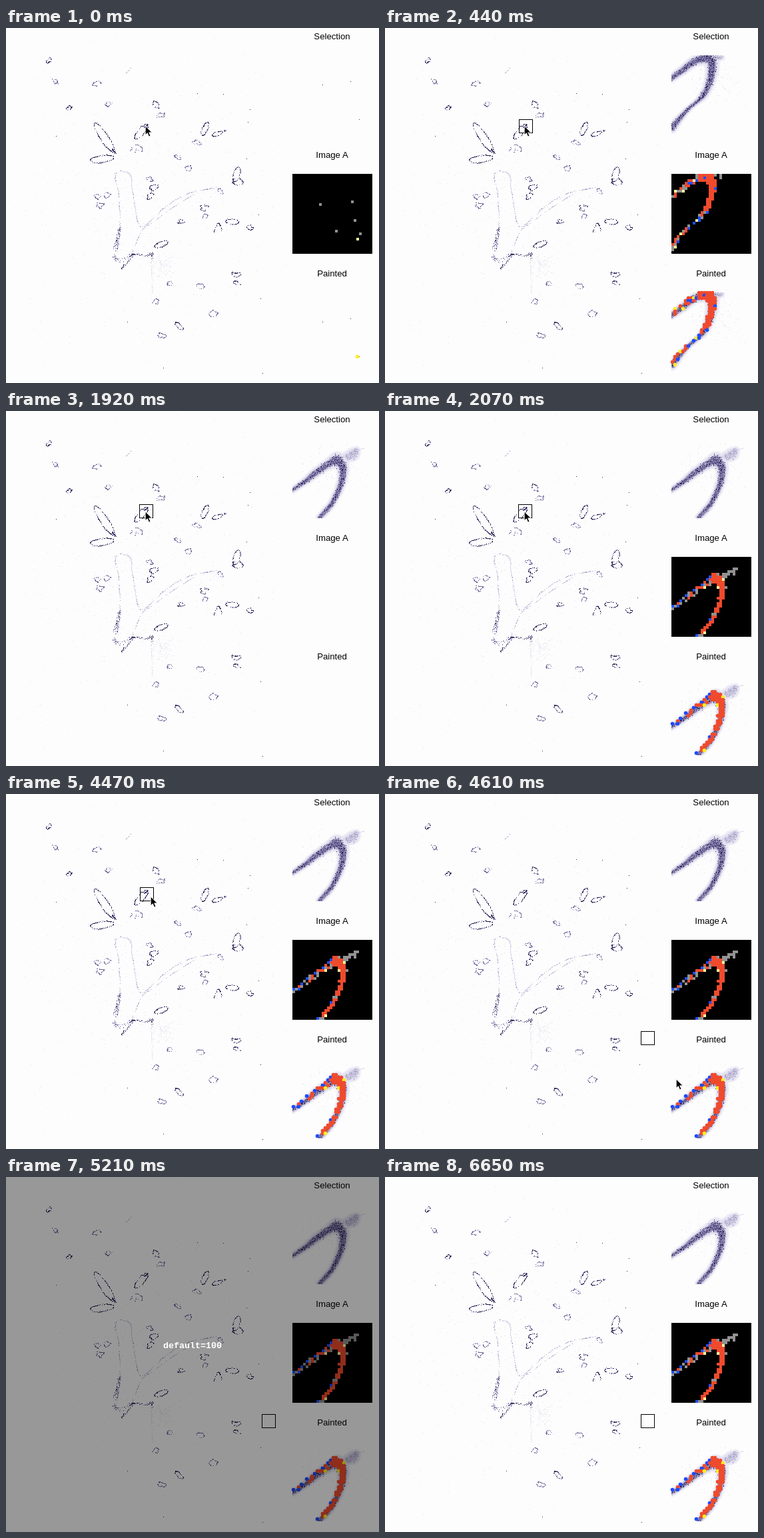
An HTML page for the animation above (8000 ms loop, 560 by 533 pixels).

```html
<!DOCTYPE html>
<html lang="en">
<head>
<meta charset="utf-8">
<title>Tissue selection</title>
<style>
html, body { margin: 0; width: 100%; height: 100%; overflow: hidden; background: #fdfdfd; }
svg { display: block; width: 100vw; height: 100vh; }
.label { font: 13.2px "Liberation Sans", Arial, sans-serif; text-anchor: middle; }
.note { font: bold 13.33px "Liberation Mono", "Courier New", monospace; text-anchor: middle; fill: #fff; }
.ink { shape-rendering: crispEdges; }
</style>
</head>
<body>
<svg id="stage" viewBox="0 0 560 533">
  <defs>
    <filter id="soft"><feGaussianBlur stdDeviation=".9"/></filter>
    <clipPath id="frame"><rect x="430" y="41" width="120" height="120"/></clipPath>
  </defs>
  <rect width="560" height="533" fill="#fdfdfd"/>
  <g id="slide" class="ink"></g>
  <g id="panels"></g>
  <text class="label" x="489.5" y="17">Selection</text>
  <text class="label" x="489.5" y="195">Image A</text>
  <text class="label" x="489.5" y="373">Painted</text>
  <rect id="box" x=".5" y=".5" width="20" height="20" fill="none" stroke="#000"/>
  <path id="cursor" d="M1.2 1V14.6L4.3 11.7L6.6 17.1L9 16.1L6.7 10.9H11.2Z" stroke="#fff" stroke-width=".9"/>
  <g id="dim">
    <rect width="560" height="533" opacity=".4"/>
    <text class="note" x="280" y="257">default=100</text>
  </g>
</svg>
<script>
const $ = id => document.getElementById(id);
const LOOP = 8000;

function add(parent, tag, attrs) {
  const el = document.createElementNS('http://www.w3.org/2000/svg', tag);
  for (const k in attrs) el.setAttribute(k, attrs[k]);
  return parent.appendChild(el);
}

let seed = 4127;
const rnd = () => (seed = seed * 16807 % 2147483647) / 2147483647;
const spread = w => (rnd() + rnd() - 1) * w;
const points = text => text.split(' ').map(p => p.split(',').map(Number));

// Samples about one pixel apart on a smooth curve; width and other values blend along
function curve(pts, closed) {
  const n = pts.length, out = [];
  const at = i => closed ? pts[(i + n) % n] : pts[Math.max(0, Math.min(n - 1, i))];
  for (let i = 0; i < (closed ? n : n - 1); i++) {
    const a = at(i - 1), b = at(i), c = at(i + 1), d = at(i + 2);
    const count = Math.ceil(Math.hypot(c[0] - b[0], c[1] - b[1]));
    for (let k = 0; k < count; k++) {
      const u = k / count;
      out.push(b.map((v, j) => j > 1 ? v + (c[j] - v) * u : v + u / 2 * (c[j] - a[j] +
        u * (2 * a[j] - 5 * v + 4 * c[j] - d[j] + u * (3 * (v - c[j]) + d[j] - a[j])))));
    }
  }
  return out;
}

// Collects one-pixel specks in four tones, dark to pale
const TONES = ['#2a2153', '#6a6397', '#aba7ca', '#e2e0ef'];
class Ink {
  paths = ['', '', '', ''];
  dot(x, y, tone) {
    this.paths[Math.min(3, tone)] += `M${Math.floor(x)} ${Math.floor(y)}h1v1h-1z`;
  }
  // Patchy grains along a curve
  trace(samples, tone, density, width) {
    const phase = rnd() * 6;
    samples.forEach(([x, y, own = width], i) => {
      const n = density * (.75 + .5 * Math.sin(phase + i / 4));
      for (let k = rnd(); k < n; k++) {
        this.dot(x + spread(own), y + spread(own), tone + Math.floor(rnd() * rnd() * 4));
      }
    });
  }
  ring(cx, cy, rx, ry, deg, tone, rough) {
    const r = deg * Math.PI / 180, pts = [];
    for (let a = 0; a < 6; a += Math.PI / 5) {
      const f = 1 + (rnd() - .5) * rough;
      const x = Math.cos(a) * rx * f, y = Math.sin(a) * ry * f;
      pts.push([cx + x * Math.cos(r) - y * Math.sin(r), cy + x * Math.sin(r) + y * Math.cos(r)]);
    }
    this.trace(curve(pts, true), tone, 1.5, .8);
  }
  haze(cx, cy, rx, ry, count, tone) {
    for (let i = 0; i < count; i++) this.dot(cx + spread(rx), cy + spread(ry), tone);
  }
  draw(parent) {
    for (let i = 3; i >= 0; i--) add(parent, 'path', { d: this.paths[i], fill: TONES[i] });
  }
}

function drawSlide() {
  const ink = new Ink();
  const line = (text, tone, density, width) => ink.trace(curve(points(text)), tone, density, width);
  ink.haze(215, 265, 215, 265, 450, 3);
  ink.haze(235, 357, 22, 20, 90, 3);

  // pale branching vessel
  line('165,346 171,302 169,250 164,222 171,215 187,221 190,245 198,291 208,297 240,268 275,248 316,240', 2, 1.1, .9);
  line('190,338 204,304 222,291 250,270 286,247', 2, .9, .9);
  line('218,343 219,365 220,400', 3, 1, 1);
  line('171,300,2 168,313,5 164,332,4 164,346,3 174,349,5 190,341,3', 1, 2.5);
  line('171,303,1 168,313,3 166,325,1', 0, 1.3);
  line('174,362,2 186,347,2 190,340,2 210,341,3 219,339,2 219,352,1', 0, 1.6);

  // long dark vessels: centre, radii, angle
  [
    [148, 165, 26, 6, 55], [144, 197, 18, 5, -8], [203, 156, 14, 5, -48], [299, 151, 11, 4, -66],
    [346, 220, 11, 5, -72], [348, 231, 8, 5, 10], [317, 159, 8, 3, -18], [340, 291, 10, 4, 5], [233, 325, 11, 4, -20]
  ].forEach(v => ink.ring(...v, 0, .12));
  line('160,182,1 164,188,2', 0, 4);
  line('208,149,1 214,146,2', 0, 3);
  line('328,155,1 331,153,1', 0, 3);
  line('187,184 193,175 203,179 204,186 196,182 194,188', 1, 1.3, .9);
  line('312,306 319,293 325,306', 0, 1.3, 1);
  line('180,69 188,59', 2, .8, .5);

  // small round vessels, dark then pale
  const small = (text, tone) => points(text).forEach(([x, y]) =>
    ink.ring(x, y, 4 + rnd() * 2, 2.5 + rnd() * 1.5, rnd() * 90 - 45, tone, .8));
  small('366,300 263,291 298,270 217,252 222,240 345,370 347,383 94,121 64,49 260,448 225,116', 0);
  small('286,172 299,283 259,194 322,245 245,384 293,387 312,429 234,462 233,131 154,114 74,80 137,83 ' +
    '137,253 151,251 141,266 274,211 224,411 217,228', 1);
  points('326,99 287,98 363,141 382,406 182,441 236,510 385,518 366,122 379,280 361,196 75,162')
    .forEach(([x, y]) => ink.dot(x, y, 0));
  ink.draw($('slide'));
}

// Each arm: x, y, width, heat; heat is the share of red cells, below zero only gray
const VIEWS = [
  [],
  [
    '428,77,7,.3 446,64,9,.3 463,51,10,.5 477,46,13,.9 490,46,16,1',
    '490,46,16,1 491,60,13,1 489,75,11,1 484,90,9,1 477,102,8,.9 468,111,5,.3 456,121,5,.2 444,134,7,.1 430,151,10,.1',
    '494,45,8,-1 506,44,5,-1'
  ],
  [
    '428,120,5,.2 450,105,7,.2 462,95,9,.3 482,81,10,.4 497,73,16,1',
    '497,73,16,1 505,83,13,1 506,92,11,1 504,106,9,1 498,122,8,1 489,139,7,.9 480,150,7,.8 470,161,6,.6',
    '512,69,10,-1 521,65,13,-1 527,58,5,-1'
  ]
].map(arms => arms.map(a => curve(points(a))));

const CELL = { gray: '#929292', yellow: '#ffff9c', blue: '#1f4fff', red: '#f04a2d' };
const PAINT = { yellow: '#ffee24', blue: '#1f4bff', red: '#f04a2d' };

function drawTissue(group, arms) {
  const halo = add(group, 'g', { filter: 'url(#soft)', fill: '#e6e4f2' });
  const body = add(group, 'g', { filter: 'url(#soft)' });
  const ink = new Ink();
  for (const arm of arms) {
    arm.forEach(([x, y, w, heat], i) => {
      add(halo, 'circle', { cx: x + spread(1), cy: y, r: w * .7 + 1 });
      if (i % 2) add(body, 'circle', { cx: x, cy: y, r: w * .4, fill: heat < 0 ? '#d3d0e4' : '#807aa9' });
      for (let k = 0; k < w * .5; k++) {
        ink.dot(x + spread(w * .6), y + spread(w * .6), heat < 0 ? 2 : Math.floor(rnd() * 2.6 - heat * .4 + .3));
      }
    });
    // thin fibres fanning out past the tip
    if (arm[0][3] < 0) {
      const [x, y] = arm[0];
      for (let i = 0; i < 4; i++) {
        ink.trace(curve([[x - 6, y], [x + 14 + rnd() * 22, y - 8 - rnd() * 18]]), 3, .8, .6);
      }
    }
  }
  if (arms.length) {
    ink.haze(492, 85, 56, 42, 120, 3);
  } else {
    points('517,80 475,85 530,137').forEach(([x, y]) => ink.dot(x, y, 0));
  }
  ink.draw(add(group, 'g', { class: 'ink' }));
}

// Colour of the 4 px cell centred at x, y
function classify(arms, x, y) {
  let best = 1, heat;
  for (const arm of arms) for (const s of arm) {
    const near = Math.hypot(x - s[0], y - s[1]) / Math.max(2.6, s[2] / 2);
    if (near < best) { best = near; heat = s[3]; }
  }
  if (heat === undefined) return;
  if (heat < 0) return rnd() < .75 ? 'gray' : undefined;
  if (rnd() < heat * (best < .8 ? 1 : .3)) return 'red';
  return ['gray', 'yellow', 'blue', 'gray', undefined][Math.floor(rnd() * 5)];
}

function buildPanel(arms) {
  const select = add($('panels'), 'g', { 'clip-path': 'url(#frame)' });
  drawTissue(select, arms);
  const result = add($('panels'), 'g', {});
  add(result, 'rect', { x: 430, y: 219, width: 120, height: 120 });
  const copy = add(result, 'g', { transform: 'translate(0 356)' });
  copy.appendChild(select.cloneNode(true));

  const mark = (col, row, hue) => {
    const x = 430 + col * 4, y = row * 4;
    add(result, 'rect', { x, y: 219 + y, width: 4, height: 4, fill: CELL[hue] });
    if (PAINT[hue]) add(result, 'circle', { cx: x + 1.5, cy: 397.5 + y, r: 2.8, fill: PAINT[hue] });
  };
  if (!arms.length) {
    points('10,11 22,10 23,17 16,21 25,22').forEach(([c, r]) => mark(c, r, 'gray'));
    mark(24, 24, 'yellow');
  }
  for (let i = 0; i < 900; i++) {
    const col = i % 30, row = Math.floor(i / 30);
    const hue = classify(arms, 432 + col * 4, 43 + row * 4);
    if (hue) mark(col, row, hue);
  }
  return { select, result };
}

drawSlide();
const panels = VIEWS.map(buildPanel);

// Time, then place or view; nothing after the time means hidden
const CURSOR = [[0, 208, 146], [740, 208, 148], [880, 208, 149], [1030, 208, 150],
  [4470, 216, 153], [4610, 436, 427], [4760, 472, 485], [4910]];
const BOX = [[0], [290, 201, 137], [740, 201, 138], [880, 201, 139], [1030, 200, 140],
  [4470, 201, 140], [4610, 384, 356]];
const SELECT = [[0, 0], [290], [440, 1], [1920, 2]];
const RESULT = [[0, 0], [440, 1], [1920], [2070, 2]];

const current = (steps, t) => steps.filter(s => s[0] <= t).pop().slice(1);
const show = (el, on) => el.setAttribute('display', on ? 'inline' : 'none');

function place(el, [x, y]) {
  show(el, x !== undefined);
  if (x !== undefined) el.setAttribute('transform', `translate(${x} ${y})`);
}

function render(t) {
  place($('cursor'), current(CURSOR, t));
  place($('box'), current(BOX, t));
  const [sel] = current(SELECT, t), [res] = current(RESULT, t);
  panels.forEach((p, i) => {
    show(p.select, i === sel);
    show(p.result, i === res);
  });
  show($('dim'), t >= 5210 && t < 6650);
}

const start = performance.now();
function tick() {
  render((performance.now() - start) % LOOP);
  requestAnimationFrame(tick);
}
tick();
</script>
</body>
</html>
```
